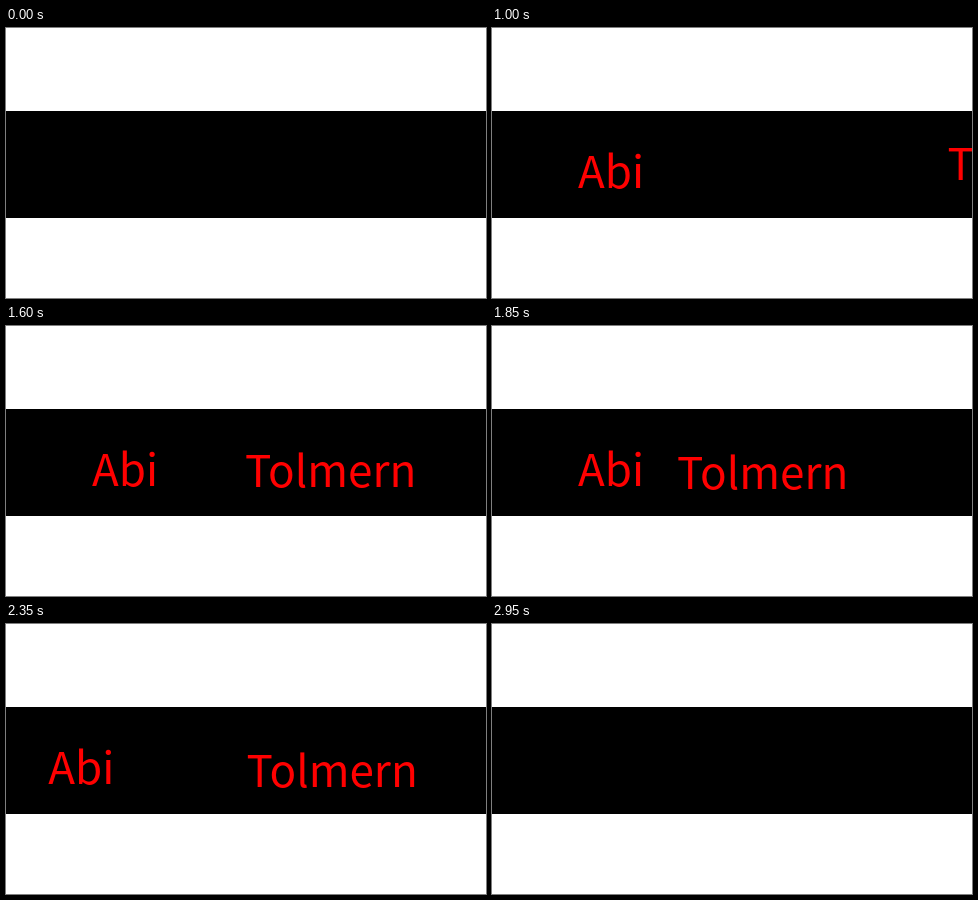
Animation of 480 by 270 pixels, one loop 4.05 s. Source, as an HTML page:

```html
<!DOCTYPE html>
<html lang="en">
<head>
<meta charset="utf-8">
<title>Name slide</title>
<style>
  html, body { margin: 0; width: 100%; height: 100%; overflow: hidden; background: #fff; }
  svg { display: block; width: 100vw; height: 100vh; }
  text { font: 400 44px "Noto Sans CJK JP", "Noto Sans CJK SC", "Noto Sans", sans-serif; fill: #f00; }
</style>
</head>
<body>
<svg viewBox="0 0 480 270">
  <rect width="480" height="270" fill="#fff"/>
  <rect y="83" width="480" height="107"/>
  <text id="first">Abi</text>
  <text id="last">Tolmern</text>
</svg>
<script>
const LOOP = 4050, STEP = 50;
const first = document.getElementById('first');
const last = document.getElementById('last');

// Keys are [time, value] pairs.
const firstOut = [[1850, 86], [2000, 84.5], [2150, 77], [2300, 53], [2450, 18], [2550, -9], [2950, -66]];
const lastIn = [[750, 483], [1050, 448], [1300, 378], [1600, 240], [1800, 188], [1850, 186]];
const lastLift = [[750, -3], [1050, -11.5], [1300, -8.5], [1600, -2.5], [1850, 0]];

// Smooth curve through the keys, flat before and after.
function curve(keys, t) {
  const end = keys.length - 1;
  if (t <= keys[0][0]) return keys[0][1];
  if (t >= keys[end][0]) return keys[end][1];
  const i = keys.findIndex(k => k[0] > t) - 1;
  const slope = j => {
    const a = keys[Math.max(j - 1, 0)], b = keys[Math.min(j + 1, end)];
    return (b[1] - a[1]) / (b[0] - a[0]);
  };
  const [t0, v0] = keys[i], [t1, v1] = keys[i + 1];
  const span = t1 - t0, u = (t - t0) / span, w = 1 - u;
  return v0 * w * w * (1 + 2 * u) + v1 * u * u * (3 - 2 * u)
    + span * u * w * (slope(i) * w - slope(i + 1) * u);
}

// Distance covered since a start time, counted in steps.
const ease = (ms, scale, power) => scale * Math.pow(Math.max(ms, 0) / STEP, power);

function firstX(t) {
  return t < 1850 ? 86 - ease(1000 - t, 1.43, 1.75) : curve(firstOut, t);
}

function lastX(t) {
  return curve(lastIn, t) + ease(t - 2150, 9.8, 1.25);
}

function place(el, x, y, shown) {
  el.setAttribute('x', x.toFixed(2));
  el.setAttribute('y', y.toFixed(2));
  el.setAttribute('visibility', shown ? 'visible' : 'hidden');
}

function draw(ms) {
  const t = Math.floor((ms % LOOP) / STEP) * STEP;
  const shown = t >= 300 && t < 2950;
  place(first, firstX(t), 160, shown);
  place(last, lastX(t) - 1, 163 + curve(lastLift, t), shown);
}

const start = performance.now();
function tick() {
  draw(performance.now() - start);
  requestAnimationFrame(tick);
}
tick();
</script>
</body>
</html>
```
